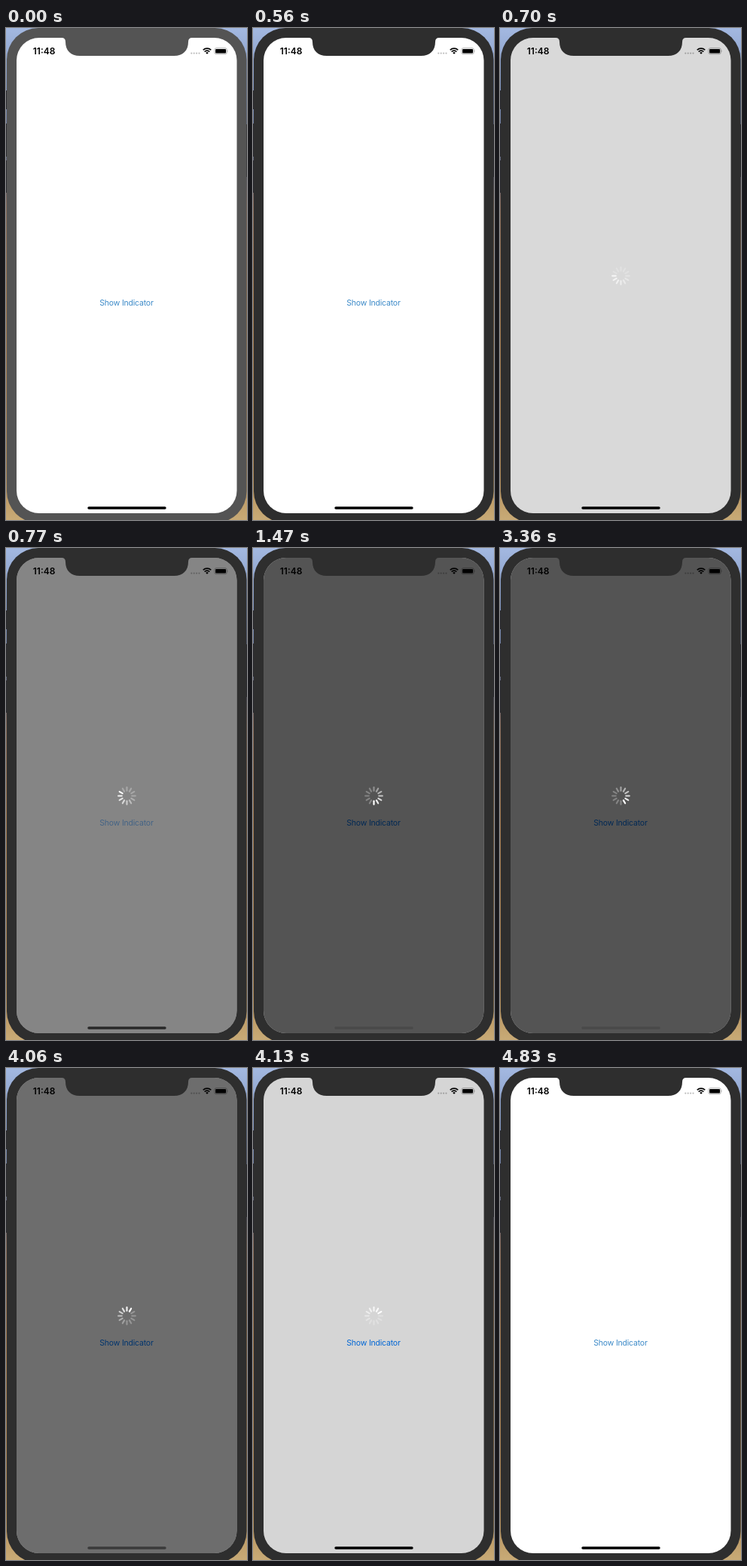
An HTML page that plays this animation: 320x654 px, repeating every 4.9 s.

```html
<!DOCTYPE html>
<html lang="en">
<head>
<meta charset="utf-8">
<title>Show Indicator</title>
<style>
  html, body { margin: 0; width: 100%; height: 100%; overflow: hidden; }
  svg { display: block; width: 320px; height: 654px; font-family: Inter, Roboto, sans-serif; }
  text { text-anchor: middle; }
  #time { font-size: 12px; font-weight: 600; }
  #label { font-size: 10.5px; letter-spacing: -.2px; }
</style>
</head>
<body>
<svg viewBox="0 0 320 654">
  <defs>
    <linearGradient id="desk" x2="0" y2="1">
      <stop offset="0" stop-color="#a3b8e0"/>
      <stop offset=".14" stop-color="#7d92bd"/>
      <stop offset=".3" stop-color="#5c5d6e"/>
      <stop offset=".36" stop-color="#8c7060"/>
      <stop offset=".55" stop-color="#a67c52"/>
      <stop offset=".9" stop-color="#b08a58"/>
      <stop offset="1" stop-color="#c8aa76"/>
    </linearGradient>
    <clipPath id="glass"><rect x="14" y="13" width="292.5" height="632" rx="30"/></clipPath>
  </defs>

  <rect width="320" height="654" fill="url(#desk)"/>
  <path d="M0 83h3v25h-3zM0 127h3v44h-3zM0 176h3v43h-3zM317 128h3v70h-3z" fill="#2b2b30"/>
  <rect class="bezel" x="1" y="0" width="318.5" height="658" rx="42"/>

  <g clip-path="url(#glass)">
    <rect x="14" y="13" width="293" height="632" fill="#fff"/>
    <text id="time" x="50.6" y="35">11:48</text>
    <g fill="#bcbcbc">
      <circle cx="246.3" cy="33.6" r="1.1"/><circle cx="249.7" cy="33.6" r="1.1"/>
      <circle cx="253.1" cy="33.6" r="1.1"/><circle cx="256.5" cy="33.6" r="1.1"/>
    </g>
    <g fill="none" stroke="#000" stroke-width="1.6">
      <path d="M261.7 29.3A7.5 7.5 0 0 1 272.3 29.3"/>
      <path d="M263.6 31.5A4.8 4.8 0 0 1 270.4 31.5"/>
      <path d="M267 34.7L265.2 32.9A2.5 2.5 0 0 1 268.8 32.9Z" fill="#000" stroke="none"/>
    </g>
    <rect x="276.9" y="26.7" width="16.4" height="8" rx="2.3" fill="none" stroke="#a0a0a0" stroke-width=".8"/>
    <rect x="278.1" y="27.9" width="14" height="5.6" rx="1.2"/>
    <path d="M294.2 29.3q1.2 1.4 0 2.8z" fill="#a0a0a0"/>
    <text id="label" x="160" y="368.7">Show Indicator</text>
    <rect id="shade" x="14" y="13" width="293" height="632"/>
    <rect id="home" x="108.3" y="636.3" width="104.4" height="3.5" rx="1.75"/>
    <g id="spin" stroke="#fff" stroke-width="2.2" stroke-linecap="round"/>
  </g>
  <path class="bezel" d="M72 12V13H74Q79 13 79 18.5C79 30 86 37 98 37H223C235 37 242 30 242 18.5Q242 13 247 13H249V12Z"/>
</svg>
<script>
  const LOOP = 4900, TICK = 70;
  const $ = id => document.getElementById(id);
  const bezels = document.querySelectorAll('.bezel');
  const spin = $('spin');
  const gray = v => `rgb(${v},${v},${v})`;

  // Each track is a list of [start ms, value]; values hold until the next start.
  const shade = [[0, 0], [700, .149], [770, .48], [840, .67], [4060, .573], [4130, .165], [4200, 0]];
  const label = [[0, 1], [630, .3], [700, 0], [770, .5], [840, 1]];
  const home = [[0, 0], [770, 40], [840, 73], [4060, 58], [4130, 0]];
  const glow = [[0, 0], [700, .8], [770, 1], [4200, 0]];
  const at = (track, t) => track.filter(k => k[0] <= t).pop()[1];

  const spokes = Array.from({ length: 12 }, (_, i) => {
    const line = document.createElementNS('http://www.w3.org/2000/svg', 'line');
    line.setAttribute('y1', -6.8);
    line.setAttribute('y2', -11.3);
    line.setAttribute('transform', `translate(160.5 329.5) rotate(${i * 30})`);
    return spin.appendChild(line);
  });

  function draw() {
    const t = Math.floor((performance.now() % LOOP + .5) / TICK) * TICK % LOOP;
    const dim = at(shade, t);
    const tone = gray(Math.round(84 - 38 * Math.min(t / 560, 1)));
    bezels.forEach(b => b.style.fill = tone);
    $('shade').style.opacity = dim;
    $('label').style.opacity = at(label, t);
    $('label').style.fill = dim ? '#007aff' : '#3c8ac8';
    $('home').style.fill = gray(at(home, t));
    spin.style.opacity = at(glow, t);

    // One turn per second in twelve steps, with a tail behind the head.
    const head = Math.floor(1 + t * .012);
    spokes.forEach((s, i) => {
      const lag = (head - i + 12) % 12;
      s.style.opacity = Math.max(.28, 1 - lag * .11);
    });
    requestAnimationFrame(draw);
  }
  draw();
</script>
</body>
</html>
```
